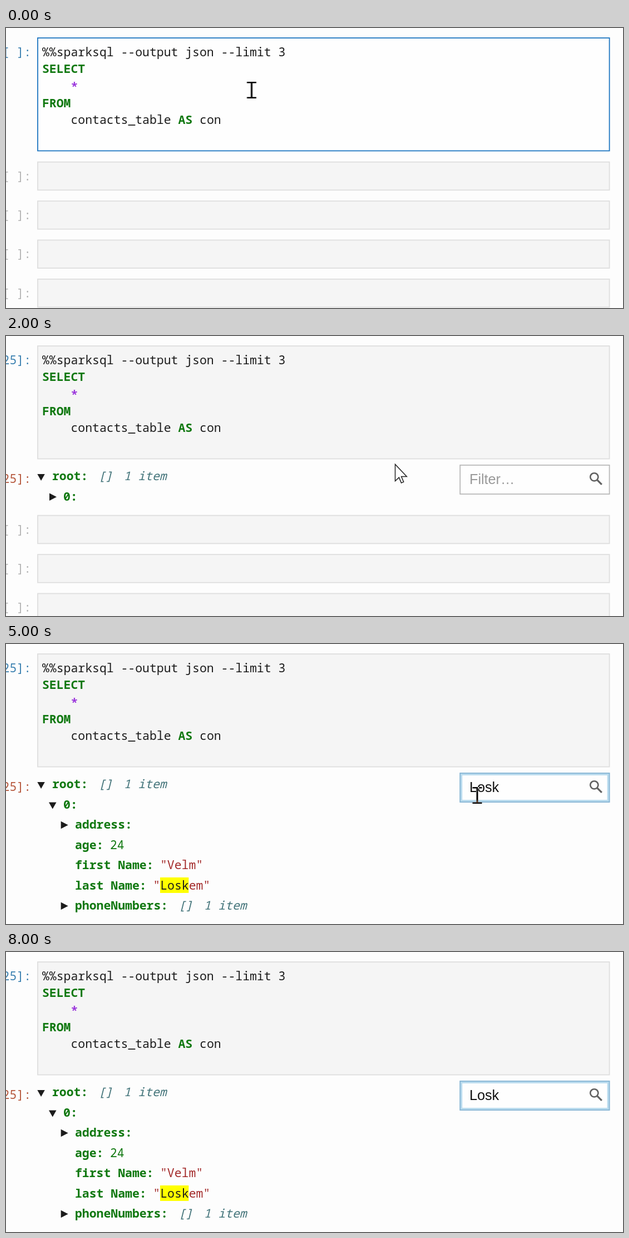
An HTML page that plays this animation: 1109 px wide and 505 px high, repeating every 9000 ms.

```html
<!DOCTYPE html>
<html lang="en">
<head>
<meta charset="utf-8">
<title>Notebook JSON filter</title>
<style>
html, body { margin: 0; width: 100%; height: 100%; overflow: hidden; background: #fdfdfd; }
svg { display: block; width: 1109px; height: 505px; }
text { font: 21.45px "Noto Sans Mono", "DejaVu Sans Mono", monospace; fill: #1c1c1c; white-space: pre; }
.key { font-weight: 700; fill: #107810; }
.num { fill: #107810; }
.str { fill: #a32a2a; }
.info { font-style: italic; fill: #43747a; }
.in, .out, .off { text-anchor: end; }
.in { fill: #3a80b0; }
.out { fill: #b5573c; }
.off { fill: #b4b4b4; }
.box { fill: #f5f5f5; stroke: #dedede; stroke-width: 1.8; }
.field text { font: 25.2px "Liberation Sans", Arial, sans-serif; fill: #111; }
.field .hint { fill: #999; }
.beam { fill: #fff; mix-blend-mode: difference; }

/* Hard cuts, one per second of a nine second loop */
.ready, .done, .busy, .ran, .beam1, .arrow, .beam2, .closed, .open, .plain, .focus,
.hint, .part, .full, .caret1, .caret2, .caret3, .cells {
  animation: 9s step-end infinite;
}
.ready { animation-name: ready; }
.done { animation-name: done; }
.busy { animation-name: busy; }
.ran { animation-name: ran; }
.beam1 { animation-name: beam1; }
.arrow, .s2 { animation-name: arrow; }
.beam2 { animation-name: beam2; }
.closed { animation-name: closed; }
.open, .full { animation-name: open; }
.plain { animation-name: plain; }
.focus { animation-name: focus; }
.hint { animation-name: hint; }
.part, .caret2 { animation-name: part; }
.caret1 { animation-name: caret1; }
.caret3 { animation-name: caret3; }
.cells { animation-name: cells; }
@keyframes ready { 0% { visibility: visible } 11.1111%, 100% { visibility: hidden } }
@keyframes done { 0% { visibility: hidden } 11.1111%, 100% { visibility: visible } }
@keyframes busy { 0%, 22.2222%, 100% { visibility: hidden } 11.1111% { visibility: visible } }
@keyframes ran { 0% { visibility: hidden } 22.2222%, 100% { visibility: visible } }
@keyframes beam1 { 0% { visibility: visible } 22.2222%, 100% { visibility: hidden } }
@keyframes arrow { 0%, 33.3333%, 100% { visibility: hidden } 22.2222% { visibility: visible } }
@keyframes beam2 { 0%, 77.7777%, 100% { visibility: hidden } 33.3333% { visibility: visible } }
@keyframes closed { 0%, 55.5555%, 100% { visibility: hidden } 11.1111% { visibility: visible } }
@keyframes open { 0% { visibility: hidden } 55.5555%, 100% { visibility: visible } }
@keyframes plain { 0%, 33.3333%, 100% { visibility: hidden } 11.1111% { visibility: visible } }
@keyframes focus { 0% { visibility: hidden } 33.3333%, 100% { visibility: visible } }
@keyframes hint { 0%, 44.4444%, 100% { visibility: hidden } 11.1111% { visibility: visible } }
@keyframes part { 0%, 55.5555%, 100% { visibility: hidden } 44.4444% { visibility: visible } }
@keyframes caret1 { 0%, 44.4444%, 100% { visibility: hidden } 33.3333% { visibility: visible } }
@keyframes caret3 { 0%, 88.8888%, 100% { visibility: hidden } 66.6666% { visibility: visible } }
@keyframes cells {
  0% { transform: none; visibility: visible }
  11.1111% { transform: translateY(82px); visibility: visible }
  55.5555%, 100% { transform: translateY(82px); visibility: hidden }
}
</style>
</head>
<body>
<svg viewBox="0 0 1109 505">
  <defs>
    <g id="cell">
      <rect class="box" x="57" y="241.7" width="1027.6" height="50.6"/>
      <text class="off" x="45" y="274.5">[ ]:</text>
    </g>
    <path id="down" d="M0 0H13.5L6.75 12Z" fill="#1c1c1c"/>
    <path id="right" d="M0 0V13.5L13 6.75Z" fill="#1c1c1c"/>
    <path id="ibeam" d="M-8.5 0H8.5V2.5H1.5V27.5H8.5V30H-8.5V27.5H-1.5V2.5H-8.5Z"/>
    <rect id="caret" y="246" width="1.8" height="26"/>
  </defs>
  <rect width="1109" height="505" fill="#fdfdfd"/>

  <!-- Code cell -->
  <g class="ready">
    <rect x="57" y="17.9" width="1027.6" height="203.6" fill="#fefefe" stroke="#1c75c0" stroke-width="1.8"/>
    <text class="in" x="45" y="50.5">[ ]:</text>
  </g>
  <rect class="box done" x="57" y="17.9" width="1027.6" height="203.6"/>
  <text class="in busy" x="45" y="50.5">[*]:</text>
  <text class="in ran" x="45" y="50.5">[25]:</text>
  <text x="65" y="50.5">%%sparksql --output json --limit 3</text>
  <text class="key" x="65" y="81">SELECT</text>
  <text x="116.5" y="113" style="font-weight:700;fill:#9a35dc">*</text>
  <text class="key" x="65" y="142.5">FROM</text>
  <text x="116.5" y="173">contacts_table <tspan class="key">AS</tspan> con</text>

  <g class="cells">
    <use href="#cell"/>
    <use href="#cell" y="70.4"/>
    <use href="#cell" y="140.8"/>
    <use href="#cell" y="211.2"/>
  </g>

  <!-- JSON tree -->
  <g class="done">
    <text class="out" x="45" y="265">[25]:</text>
    <use href="#down" x="56.3" y="249"/>
    <text class="key" x="83" y="259.5">root:</text>
    <text class="info" x="166" y="259.5">[]</text>
    <text class="info" x="211.5" y="259.5">1 item</text>
    <text class="key" x="103" y="296.5">0:</text>
  </g>
  <use class="closed" href="#right" x="78" y="283.5"/>
  <g class="open">
    <use href="#down" x="77" y="285.5"/>
    <use href="#right" x="98.7" y="319.8"/>
    <text class="key" x="124" y="332.5">address:</text>
    <text class="key" x="124" y="369.5">age:</text>
    <text class="num" x="187" y="369.5">24</text>
    <text class="key" x="124" y="405.5">first Name:</text>
    <text class="str" x="277" y="405.5">"Velm"</text>
    <text class="key" x="124" y="442.5">last Name:</text>
    <rect x="277" y="421" width="51.3" height="28" fill="#ff0"/>
    <text class="str" x="264.3" y="442.5">"<tspan fill="#1c1c1c">Losk</tspan>em"</text>
    <use href="#right" x="98.7" y="465.8"/>
    <text class="key" x="124" y="478.5">phoneNumbers:</text>
    <text class="info" x="310" y="478.5">[]</text>
    <text class="info" x="355.5" y="478.5">1 item</text>
  </g>

  <!-- Filter field -->
  <g class="field">
    <rect class="plain" x="816.2" y="232.9" width="268.4" height="52.2" fill="#fefefe" stroke="#b9b9b9" stroke-width="1.8"/>
    <g class="focus">
      <rect x="818" y="234.7" width="264.8" height="48.6" fill="#fefefe" stroke="#b9dbee" stroke-width="4.4"/>
      <rect x="816.2" y="232.9" width="268.4" height="52.2" fill="none" stroke="#86b5d4" stroke-width="1.8"/>
    </g>
    <g class="done" fill="none" stroke="#616161">
      <circle cx="1057.3" cy="254.3" r="7.1" stroke-width="2.6"/>
      <path d="M1062.6 259.6L1070.8 267.8" stroke-width="3.2"/>
    </g>
    <text class="hint" x="833" y="267">Filter…</text>
    <text class="part" x="833" y="267">Lo</text>
    <text class="full" x="833" y="267">Losk</text>
    <use class="caret1" href="#caret" x="833"/>
    <use class="caret2" href="#caret" x="860.5"/>
    <use class="caret3" href="#caret" x="885.5"/>
  </g>

  <!-- Pointers -->
  <use class="beam beam1" href="#ibeam" x="441.5" y="97"/>
  <path class="arrow" transform="translate(699.5 231.5)" d="M0 0V30L6.9 23.6L11 33.4L15.2 31.6L11.1 22H20.8Z" fill="#fff" stroke="#222" stroke-width="1.5"/>
  <use class="beam beam2" href="#ibeam" x="847" y="258"/>
</svg>
</body>
</html>
```
